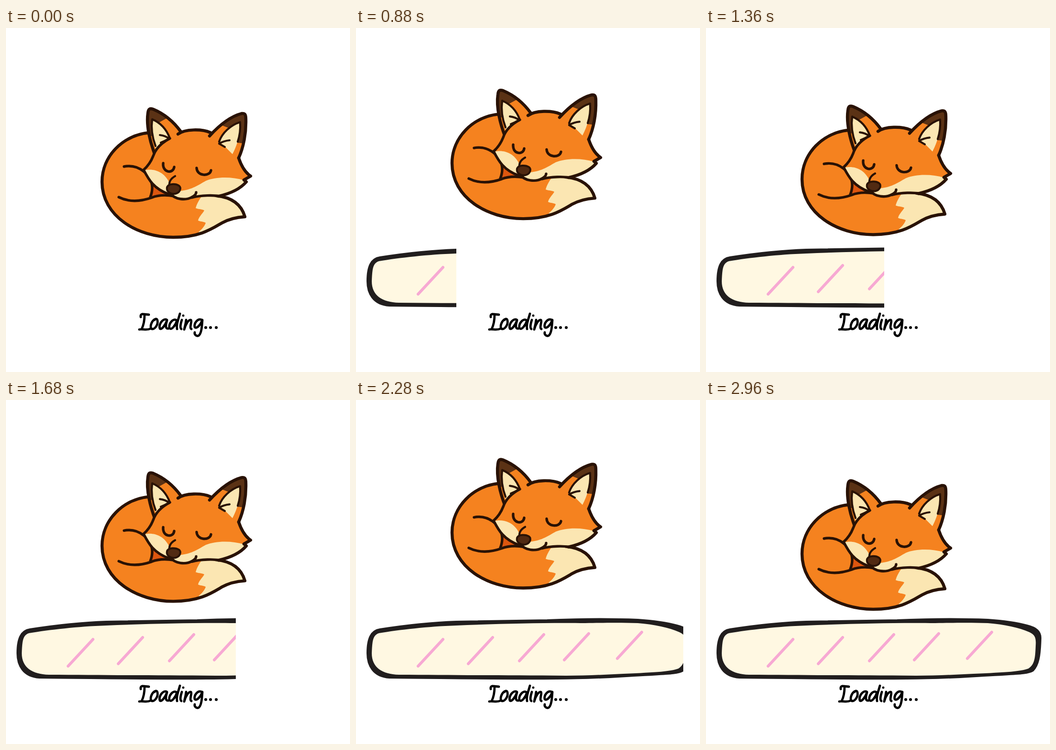
Write an HTML page that moves like this. It is 720 px wide and 720 px high and loops after 3 s.

```html
<!DOCTYPE html>
<html lang="en">
<head>
<meta charset="utf-8">
<title>Loading</title>
<style>
html, body { margin: 0; height: 100%; overflow: hidden; background: #fff; }
svg { display: block; width: 720px; height: 720px; }
.line { fill: none; stroke: #291205; stroke-width: 6.4; stroke-linecap: round; stroke-linejoin: round; }
.mid { stroke-width: 5.4; }
.thin { stroke-width: 4.2; }
.orange { fill: #f5821f; }
.cream { fill: #fbe6b2; }
.brown { fill: #5b3215; }
.pink { fill: none; stroke: #f7a9d3; stroke-width: 6; stroke-linecap: round; }
.letters { fill: none; stroke: #000; stroke-width: 4.8; stroke-linecap: round; stroke-linejoin: round; }
.dots { stroke-width: 6; }
</style>
</head>
<body>
<svg viewBox="0 0 720 720">
  <defs>
    <clipPath id="wipe"><rect id="reveal" width="0" height="720"/></clipPath>
    <path id="body" d="M300 219C245 224 201 268 201 322C201 394 275 438 350 438C405 438 430 421 452 408C468 399 485 396 500 395C494 374 478 355 440 351L400 340L340 250Z"/>
    <path id="earL" d="M312 266C302 240 293 205 297 178C298 168 302 168 308 170C332 180 350 195 366 217"/>
    <path id="earR" d="M426 226C447 203 470 185 493 179C500 178 502 181 502 190C503 220 497 250 487 272"/>
    <clipPath id="inBody"><use href="#body"/></clipPath>
    <clipPath id="inEarL"><use href="#earL"/></clipPath>
    <clipPath id="inEarR"><use href="#earR"/></clipPath>
  </defs>

  <g clip-path="url(#wipe)">
    <path fill="#211e1e" stroke="#211e1e" stroke-width="2" d="M23 530C23 500 30 482 50 479C95 472 150 465 210 463L400 460C470 457 540 457 590 459C620 461 650 465 672 471C692 476 702 484 701 500C700 535 697 555 685 567C675 574 650 574 600 577C540 580 500 584 420 584C300 585 200 583 70 582C35 580 23 555 23 530Z"/>
    <path fill="#fff8e2" d="M33 530C34 505 35 492 48 488C90 481 150 474 210 472C300 468 400 466 480 467C530 466 560 466 590 467C625 470 655 476 677 486C690 492 691 500 690 515C689 540 688 553 675 562C660 568 630 570 560 573C520 575 480 577 440 577C300 576 200 576 90 575C55 574 33 560 33 530Z"/>
    <path class="pink" d="M130 557l52-56M235 552l51-55M342 546l51-55M436 544l51-55M547 541l51-55"/>
  </g>

  <g id="fox">
    <use href="#body" class="orange"/>
    <g clip-path="url(#inBody)">
      <path class="cream" d="M411 350C404 360 399 369 397 377C405 380 412 379 415 382C410 390 403 396 402 403C409 406 415 405 418 408C415 416 409 422 403 427L440 445L520 400L470 340Z"/>
    </g>
    <path fill="#dd560f" d="M306 328L342 348C325 347 315 350 304 354Z"/>
    <use href="#body" class="line"/>
    <path class="line mid" d="M247 290C278 284 306 308 306 334C306 342 304 349 302 354M236 354C262 367 288 361 305 355C320 349 335 349 352 352"/>

    <!-- ears -->
    <path class="orange" d="M312 266C302 240 293 205 297 178C298 168 302 168 308 170C332 180 350 195 366 217L345 255Z"/>
    <use href="#earR" class="orange"/>
    <g clip-path="url(#inEarL)"><path class="brown" d="M290 160H345L338 188L318 199L308 225L290 230Z"/></g>
    <g clip-path="url(#inEarR)"><path class="brown" d="M450 203L468 210L484 240L510 243V170H450Z"/></g>
    <path class="cream" d="M306 191C303 210 306 235 313 252C320 243 330 237 343 231C336 212 325 199 306 191Z"/>
    <use href="#earL" class="line"/>

    <!-- head -->
    <path class="orange" d="M343 231L360 221C375 211 410 211 427 219L487 265C493 288 500 302 513 310L498 318L504 322C490 337 472 346 445 352L398 352C385 361 355 362 344 348C308 336 298 316 288 297C297 289 303 281 308 268C312 256 320 243 343 231Z"/>
    <path class="cream" d="M289 298C308 293 330 300 341 322L350 342L366 341C390 338 402 329 418 320C440 311 472 311 499 319L504 322C490 337 472 346 445 352L398 352C385 361 355 362 344 348C308 336 298 316 289 298Z"/>
    <path class="cream" d="M490 197C470 203 452 220 446 238L459 249L474 264C484 245 492 220 490 197Z"/>
    <use href="#earR" class="line"/>
    <path class="line thin" d="M313 247C305 226 304 205 306 191C325 199 336 212 343 231M446 238C452 220 470 203 490 197C491 212 489 226 485 238"/>
    <path class="line thin" d="M322 224C331 225 337 228 342 232M324 240L342 232M468 235C458 236 451 239 446 242L458 249"/>
    <path class="line mid" d="M343 231C320 243 312 256 308 268C303 281 297 289 288 297C298 316 308 336 341 348"/>
    <path class="line" d="M360 222C375 211 410 211 428 219M487 272C493 290 500 302 512 310L498 318L503 322C490 337 472 346 445 352"/>
    <path class="line mid" d="M344 345C352 360 377 361 389 354C395 351 398 348 398 344M389 355C407 350 435 349 456 353"/>
    <path class="line mid" d="M329 283C327 303 350 306 352 291M399 293C400 311 427 311 429 298"/>
    <path class="line thin" d="M354 310C345 315 341 322 342 330"/>
    <path d="M337 333C340 326 354 325 362 330C368 335 364 345 354 347C344 348 335 342 337 333Z" fill="#512a12" stroke="#291205" stroke-width="4"/>
  </g>

  <g class="letters" role="img" aria-label="Loading...">
    <path d="M282 605C281 600 284 598 288 599L299 600M290 600C290 612 288 622 284 630M279 631C286 629 294 634 303 629"/>
    <path d="M313 609C305 612 301 624 304 629C309 634 319 622 317 612C316 608 313 608 311 611"/>
    <path d="M337 611C329 606 319 620 322 629C326 633 334 620 337 612C334 622 333 630 340 629"/>
    <path d="M357 612C350 606 340 619 342 628C346 634 355 622 358 612M364 598C360 612 356 622 358 630"/>
    <path d="M368 611C365 620 364 628 367 630M371 602h.1"/>
    <path d="M377 611C376 620 374 626 373 631C376 620 382 610 387 611C390 613 383 628 388 630"/>
    <path d="M410 611C402 606 393 618 395 626C399 631 408 620 411 611C410 626 409 640 403 644C398 646 394 641 395 637"/>
    <path class="dots" d="M418 627h.1M428 627h.1M440 627h.1"/>
  </g>
</svg>
<script>
const LOOP = 3000, STEP = 40, RISE = 720, HEIGHT = 50;
const fox = document.getElementById('fox');
const reveal = document.getElementById('reveal');
const start = performance.now();

// Two linear bounces; the second rests one step at the top.
function lift(t) {
  if (t >= 2 * RISE) {
    t -= 2 * RISE;
    if (t > RISE) t = Math.max(RISE, t - STEP);
  }
  const p = t / RISE;
  return HEIGHT * Math.max(0, Math.min(p, 2 - p));
}

function draw(now) {
  const t = Math.floor(Math.max(0, now - start) % LOOP / STEP) * STEP;
  fox.setAttribute('transform', `translate(0 ${-lift(t)})`);
  reveal.setAttribute('width', Math.max(0, Math.round(88 + (t - 520) * 0.339)));
  requestAnimationFrame(draw);
}
draw(start);
</script>
</body>
</html>
```
